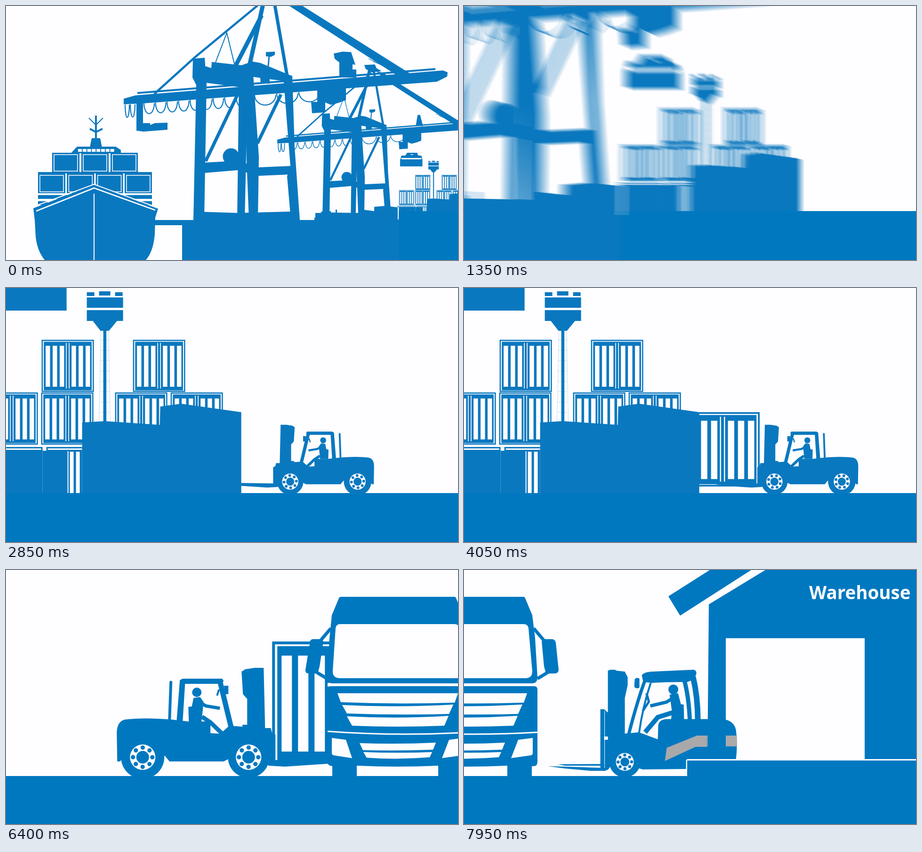
Animation of 960 by 540 pixels, one loop 8000 ms. Source, as an HTML page with a canvas:

```html
<!DOCTYPE html>
<html lang="en">
<head>
<meta charset="utf-8">
<title>From port to warehouse</title>
<style>
html, body { margin: 0; width: 100%; height: 100%; overflow: hidden; background: #fefdff; }
canvas { display: block; width: 960px; height: 540px; }
</style>
</head>
<body>
<canvas id="stage" width="960" height="540"></canvas>
<script>
const LOOP = 8000, W = 960, H = 540, GROUND = 438;
const BLUE = '#0078c0', SOFT_BLUE = '#0a78bf', WHITE = '#fefdff', GRAY = '#a9a9ac';
const ZOOM = 3.45, ZOOM_START = 865, ZOOM_END = 1760;
const stage = document.getElementById('stage').getContext('2d');
const layer = document.createElement('canvas');
layer.width = W;
layer.height = H;
let g = stage, ink = BLUE;

const clamp = v => Math.min(1, Math.max(0, v));
const span = (t, a, b) => clamp((t - a) / (b - a));
const smooth = u => u * u * (3 - 2 * u);

const cache = {};
const path = d => cache[d] || (cache[d] = new Path2D(d));

function fill(d, color = ink) {
  g.fillStyle = color;
  g.fill(path(d));
}
function line(d, width, color = ink) {
  g.strokeStyle = color;
  g.lineWidth = width;
  g.stroke(path(d));
}
function rect(x, y, w, h, color = ink) {
  g.fillStyle = color;
  g.fillRect(x, y, w, h);
}
function dot(x, y, r, color = ink) {
  g.fillStyle = color;
  g.beginPath();
  g.arc(x, y, r, 0, Math.PI * 2);
  g.fill();
}
function at(x, y, sx, sy, draw) {
  g.save();
  g.translate(x, y);
  g.scale(sx, sy);
  draw();
  g.restore();
}

function container(x, y, size) {
  at(x, y, size / 260, size / 260, () => {
    rect(0, 0, 260, 260);
    rect(6, 6, 248, 248, WHITE);
    rect(11, 10, 238, 242);
    for (const half of [20, 149])
      for (let i = 0; i < 3; i++) rect(half + i * 35, 30, 22, 204, WHITE);
    rect(121, 16, 4, 227, WHITE);
    rect(135, 16, 4, 227, WHITE);
  });
}

function wheel(x, y, r, rim, turn) {
  dot(x, y, r);
  dot(x, y, rim, WHITE);
  dot(x, y, rim * .5);
  for (let i = 0; i < 8; i++) {
    const a = turn + i * Math.PI / 4;
    dot(x + Math.cos(a) * rim * .76, y + Math.sin(a) * rim * .76, rim * .17);
  }
}

function shipContainer(x, y, w) {
  rect(x, y, w, 42);
  g.strokeStyle = WHITE;
  g.lineWidth = 1.6;
  g.strokeRect(x + 4, y + 4, w - 8, 35);
}

function ship() {
  line('M191 233V283', 4);
  line('M176 238L191 253L206 238', 2);
  line('M178 261L191 268L205 261', 4);
  fill('M182 281H200L204 301H178Z');
  fill('M151 299H233L244 306V313H138L146 304Z');
  for (let i = 0; i < 8; i++) rect(153 + i * 9.8, 304, 8, 6, WHITE);
  for (let i = 0; i < 3; i++) shipContainer(98 + i * 62, 312, 58);
  for (let i = 0; i < 4; i++) shipContainer(68 + i * 61.3, 356, 58);
  rect(68, 353, 242, 3);
  rect(68, 402, 242, 8);
  rect(68, 415, 20, 8);
  rect(285, 415, 25, 8);
  fill('M58 430L187 380L323 431L317 450L316 485Q313 522 297 540L250 600H120L82 540Q66 520 63 490L61 455Z');
  line('M68 423L187 379L312 425', 2, WHITE);
  line('M64 436L187 387L317 434', 2.6, WHITE);
  line('M187 399V600', 2, WHITE);
}

function crane(near) {
  // masts and stays
  line('M554 -40L518 122M543 20L486 130', 9);
  line('M565 -36L597 148', 7);
  line('M557 -24L533 0L400 110L315 187', 4.5);
  line('M445 120L469 57L485 123', 2);
  fill('M575 -28L598 -22L630 0L862 146L834 150L602 0Z');
  line('M790 118L852 145M780 118L846 146M770 112L840 147', 1.3);
  fill('M535 -48L570 -50L575 -38L592 -28L560 -24L540 -35Z');
  // boom
  fill('M250 197L275 190L915 138L928 137L938 141L937 150L915 161L291 207L250 209Z');
  line('M279 185L912 134', 4);
  if (near) fill('M277 205H291V249H306V253L316 249L343 248V263L292 267L277 265Z');
  g.strokeStyle = ink;
  g.lineWidth = 2.2;
  const loop = (x, w, d) => {
    g.beginPath();
    g.ellipse(x + w / 2, 207 - (x - 291) * .0737, w / 2, d, 0, 0, Math.PI);
    g.stroke();
  };
  loop(253, 9, 27);
  loop(264, 10, 27);
  for (let x = 293; x < 490; x += 24.5) loop(x, 22, 22);
  for (let x = 528; x < 640; x += 47) loop(x, 45, 21);
  // frame
  fill('M397 112L422 110L426 165L421 455H398L404 168L396 152Z');
  fill('M424 128L436 132L437 119L500 126L523 118L540 121L608 149L607 162L520 150L500 173L400 160Z');
  fill('M495 140H514L507 455H491Z');
  fill('M506 130H524L537 320L535 455H516L511 330Z');
  fill('M589 150L608 148L613 300L624 455H605L597 362L604 340Z');
  fill('M421 333L492 329L537 343L606 340V358L537 361L492 349L421 355Z');
  dot(478, 320, 17.5);
  line('M492 188L424 330M584 188L534 292', 7);
  fill('M398 455L400 437L492 440L605 437L624 455Z');
  // lamp
  fill('M552 98L571 97V104L563 108L552 107Z');
  line('M559 104L557 128', 3);
  fill('M539 140H560V165H541Z');
  // trolley
  if (near) fill('M696 101L715 97L733 98L742 125L736 124V135H744V152H708V120L698 112Z');
  else fill('M710 116L718 115L728 152H704Z');
  fill('M661 176L722 174V200L706 206L690 210L678 205V226L650 228L648 204H661Z');
}

function spreader() {
  rect(837, 326, 47.5, 15);
  fill('M838 323L840 318H848L852 312L862 317L872 312L876 318H882L884 323Z');
  fill('M852 312H874V315H852Z');
  rect(838, 324, 2, 3);
  rect(882, 324, 2, 3);
}

function yard() {
  container(-43, 222, 111);
  container(75, 222, 111);
  container(232, 222, 111);
  container(350, 222, 111);
  container(76, 110, 111);
  container(270, 110, 111);
  rect(-55, 338, 133, 130);
  rect(-55, 341, 130, 3, WHITE);
  rect(-52, 347, 8, 90, WHITE);
  rect(86, 338, 76, 130);
  rect(78, 346, 10, 120);
  rect(89, 341, 73, 3, WHITE);
  rect(131, 347, 2, 90, WHITE);
  rect(136, 348, 8, 89, WHITE);
  rect(149, 348, 8, 89, WHITE);
  // control tower
  g.globalAlpha = .22;
  line('M202 90L198 285M218 90L222 285', 1);
  for (let y = 110; y < 280; y += 22) rect(200, y, 20, 1);
  g.globalAlpha = 1;
  rect(172, 9, 16, 8);
  rect(198, 7, 24, 9);
  rect(232, 9, 16, 8);
  rect(172, 20, 77, 22);
  rect(172, 47, 77, 23);
  fill('M184 69H237L219 91H201Z');
  rect(207, 90, 6.5, 195);
}

function yardBlock() {
  fill('M162 286L210 283L327 291L328 252L372 246L500 264V470H162Z');
}

function harbour(t) {
  // the camera zooms about a fixed point on the quay
  const s = 1 + (ZOOM - 1) * smooth(span(t, ZOOM_START, ZOOM_END));
  const tx = -1193 * (s - 1), ty = -460.6 * (s - 1);
  const inYard = draw => at(tx + 847.1 * s, ty + 327.1 * s, s / ZOOM, s / ZOOM, draw);
  ink = SOFT_BLUE;
  at(tx, ty, s, s, () => {
    crane(true);
    at(672 - 398 * .648, 156.7, .648, .648, () => crane(false));
    spreader();
    rect(316, 455, 70, 11);
    fill('M374 455H655V450L690 439L745 440L758 439V433L782 436V427L804 425L832 428V455H992V600H374Z');
    fill('M657 440H668L672 436H690V441H700V433H703V441H720V452H657Z');
  });
  inYard(yard);
  at(tx, ty, s, s, ship);
  // the forklift takes its load from behind the block
  const arrive = 470 + 1056 * (1 - span(t, 1500, 3450)) ** 2;
  const mast = t < 3550 ? arrive : 470 + .31 * (t - 3550);
  if (t > 1700) {
    const a = mast + 226.7;
    if (t > 3500) container(a - 382, 264, 158);
    at(a, 437 - 438 * .636, -.636, .636, () => forklift(-mast / 28));
  }
  inYard(yardBlock);
  ink = BLUE;
  const left = 834 * s + tx;
  rect(left, 436, W * 3 - left, 110);
}

function forklift(turn) {
  fill('M23 345Q24 322 40 318Q80 313 140 318L175 322H214L222 328V347L243 348L262 331L290 333V329H318L346 340V412L260 402L250 407H135L125 395L35 400L30 407H24Z');
  line('M138 237L135 320', 6);
  dot(138, 238, 2.5);
  fill('M157 234L163 231H247L250 236L246 242H168L163 322H150Z');
  line('M243 240L266 335', 11);
  rect(251, 246, 9, 18);
  line('M240 254L236 267', 4);
  dot(193, 260, 10);
  fill('M186 272L200 270L207 280L206 295L203 322H178L182 292Z');
  fill('M175 291L183 290L186 322H176Z');
  line('M198 280L212 289L242 294', 7);
  line('M204 312L222 324L246 347', 9);
  fill('M288 216L296 211L316 208H335L338 336H350L353 347L360 350V404L345 415L300 400V274L291 264Z');
  fill('M345 400L360 404L525 402L470 412L380 418L345 416Z');
  wheel(78, 398, 46, 27, turn);
  wheel(303, 398, 44, 27, turn);
}

function truck() {
  line('M140 124L118 150M132 231L109 217', 7);
  line('M424 124L446 150M432 231L455 217', 7);
  fill('M96 151Q98 147 102 147H121L124 152L116 205L112 220H92Q85 219 86 212Z');
  fill('M441 152L444 147H464Q470 148 471 155L477 212Q477 219 469 220H450L446 205Z');
  rect(133, 240, 299, 8, WHITE);
  fill('M157 60Q158 57 162 57H402Q405 57 406 60L421 96L427 145L432 228Q432 241 420 241H143Q132 241 132 230L137 145L142 96Z');
  fill('M160 115H402Q412 115 413 124L421 215Q421 229 408 230H158Q143 229 144 214L150 124Q151 115 160 115Z', WHITE);
  fill('M139 247H425Q432 247 432 254V408Q432 417 424 417H420V445H368V416Q282 420 195 416V445H143V417Q132 416 132 406V254Q132 247 139 247Z');
  fill('M154 262H410L403 282Q282 286 161 281Z', WHITE);
  fill('M164 287Q282 293 400 286L391 306Q282 309 174 305Z', WHITE);
  fill('M174 311Q282 317 390 310L381 331Q282 335 185 331Z', WHITE);
  line('M133 343Q282 354 432 345', 3, WHITE);
  fill('M142 357L172 361L185 400L146 394Q142 393 142 389Z', WHITE);
  fill('M422 357L391 361L376 400L418 394Q422 393 422 389Z', WHITE);
  fill('M201 368Q282 371 363 367L357 382Q282 385 208 383Z', WHITE);
  fill('M209 387Q282 390 355 387L350 398Q282 404 216 399Z', WHITE);
}

function sideForklift(turn) {
  fill('M340 348L372 345L412 360L413 330Q415 318 430 317H550Q574 320 578 340Q582 370 578 403H472V423L380 424L330 410Z');
  fill('M306 214L311 212H321L324 214L342 216L348 228V245L342 272V350L336 385L306 425H290V296H298L306 303Z');
  line('M299 300V424', 1, WHITE);
  rect(298, 354, 8, 7, WHITE);
  fill('M178 417L230 418.5L302 421V427H270L215 422Z');
  fill('M200 413L290 412.5L302 416L215 416Z');
  fill('M378 224Q382 217 400 216L488 212Q494 213 494 220L490 232L475 238Q430 238 400 240L381 238Z');
  line('M385 234Q368 280 350 350', 7);
  line('M397 240Q380 290 372 348', 4);
  line('M468 233Q478 270 480 320', 9);
  line('M487 228Q497 270 497 320', 12);
  fill('M363 232Q368 227 373 231V250Q366 254 362 248Z');
  line('M388 262L393 280L380 300', 5);
  dot(445, 254, 10.5);
  fill('M437 265L455 262L461 285L463 320H440L442 300Z');
  fill('M457 285L467 286L468 320H456Z');
  line('M445 272L430 281L396 289', 7);
  line('M444 303L412 313L385 345', 10);
  fill('M431 378L495 352H516V376H492L427 406Z', GRAY);
  rect(516, 352, 64, 23, GRAY);
  wheel(342, 408, 33, 19, turn);
}

function warehouse(t) {
  const back = .4 * (7950 - t);
  at(back, 0, 1, 1, () => sideForklift(back / 33));
  fill('M434 56L522 0H610L459 97Z');
  fill('M520 73L640 0H1400V402H851V145H556V402H517Z');
  rect(474, 402, 900, 3, WHITE);
  rect(474, 405, 900, 40);
  g.fillStyle = WHITE;
  g.font = 'bold 38.5px "Open Sans", "Noto Sans", sans-serif';
  g.fillText('Warehouse', 733, 62);
}

function delivery(t) {
  const cam = 919 * (1 - (1 - span(t, 6900, 7900)) ** 4.09);
  const run = Math.min(349, .265 * (t - 5600));
  at(run - cam, 0, 1, 1, () => {
    container(353, 152, 260);
    forklift(run / 45);
  });
  const drive = 93 * smooth(span(t, 7100, 7950));
  at(550 - cam + drive, 0, 1, 1, truck);
  if (t > 6850) at(919 - cam, 0, 1, 1, () => warehouse(t));
  rect(-W, GROUND, W * 3, 110);
}

function scene(t) {
  rect(0, 0, W, H, WHITE);
  const pan = W * smooth(span(t, 4350, 5100));
  if (pan < W) at(-pan, 0, 1, 1, () => harbour(t));
  if (pan > 0) {
    g.save();
    g.translate(W - pan, 0);
    g.beginPath();
    g.rect(0, 0, W, H);
    g.clip();
    rect(0, 0, W, H, WHITE);
    delivery(t);
    g.restore();
  }
}

function render(t) {
  if (t <= ZOOM_START || t >= ZOOM_END) {
    g = stage;
    scene(t);
    return;
  }
  // motion blur: average of moments within the shutter
  const samples = 12, shutter = 22;
  for (let i = 0; i < samples; i++) {
    g = layer.getContext('2d');
    scene(t + shutter * ((i + .5) / samples - .5));
    stage.globalAlpha = 1 / (i + 1);
    stage.drawImage(layer, 0, 0);
  }
  stage.globalAlpha = 1;
}

const start = performance.now();
function tick() {
  render((performance.now() - start) % LOOP);
  requestAnimationFrame(tick);
}
tick();
</script>
</body>
</html>
```
